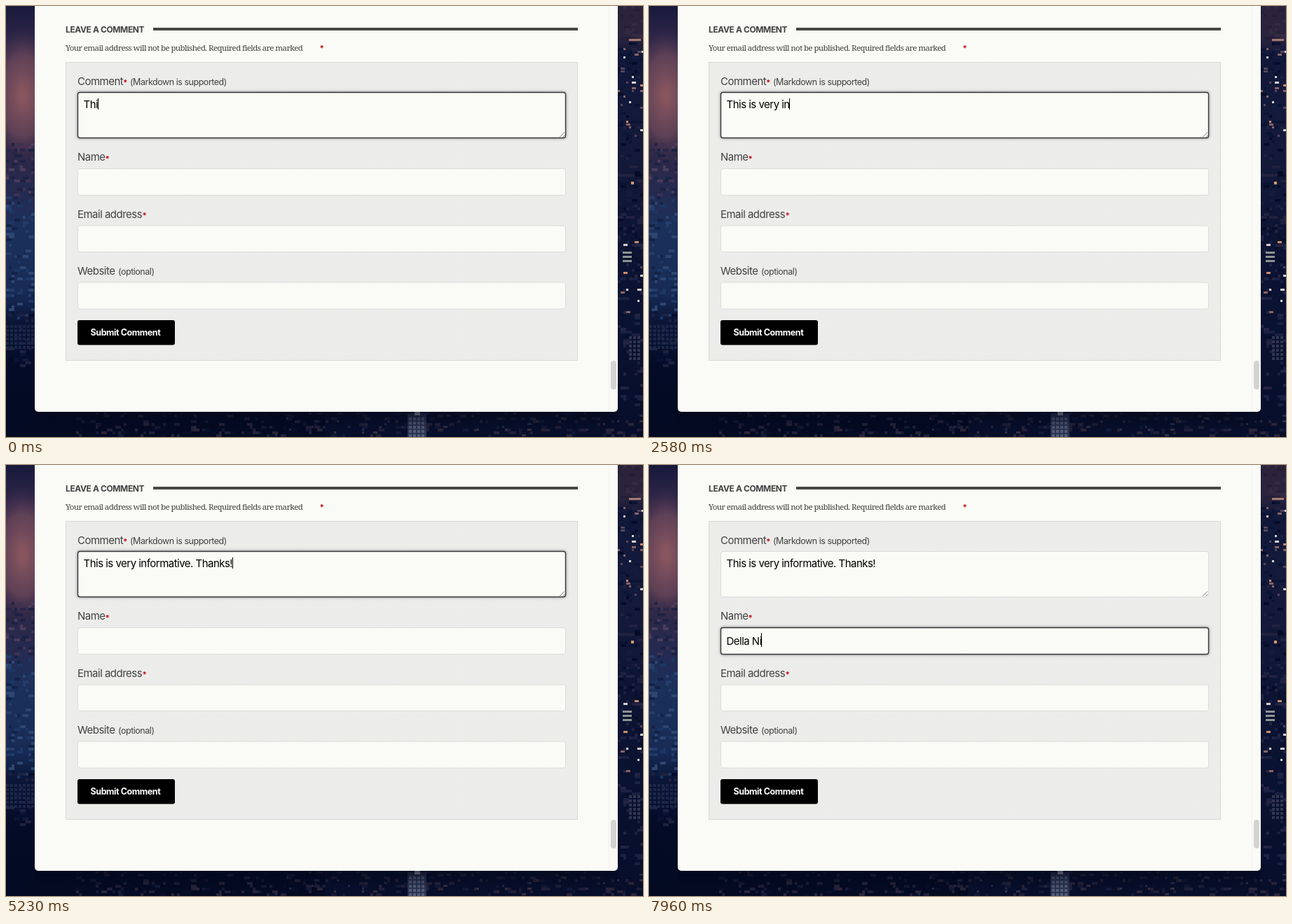
An HTML page with a canvas that plays this animation: 909 px wide and 616 px high, repeating every 8 s.

```html
<!DOCTYPE html>
<html lang="en">
<head>
<meta charset="utf-8">
<title>Comment form</title>
<style>
  html, body { margin: 0; width: 100%; height: 100%; overflow: hidden; background: #050c26; }
  canvas, svg { position: absolute; left: 0; top: 0; }
  text { font: 15px Inter, sans-serif; letter-spacing: -.52px; fill: #414141; white-space: pre; }
  .small { font-size: 12.5px; letter-spacing: -.47px; }
  .title { font-size: 12px; font-weight: 700; letter-spacing: -.38px; }
  .note { font: 11.5px "Noto Serif", serif; letter-spacing: -.6px; }
  .send { font-size: 12.5px; font-weight: 700; letter-spacing: -.42px; fill: #fff; }
  .star { font-size: 11px; font-weight: 800; fill: #c4161c; }
  .typed { fill: #000; }
  .field { fill: #fafbf6; stroke: #dbdbd9; }
  .focus { stroke: #37383b; stroke-width: 1.4; filter: drop-shadow(0 0 2px #8b8b8b); }
</style>
</head>
<body>
<canvas id="city" width="909" height="616"></canvas>
<svg width="909" height="616">
  <defs>
    <pattern id="hatch" width="4" height="4" patternUnits="userSpaceOnUse">
      <path d="M-1 1 1 -1M0 4 4 0M3 5 5 3" stroke="#e7e7e6"/>
    </pattern>
  </defs>
  <rect x="41" y="-10" width="832" height="590" rx="5" fill="#fafbf6"/>
  <path d="M860.5 0V580" stroke="#f0f1ed"/>
  <rect x="863" y="507" width="8" height="41" rx="4" fill="#d3d3d1"/>

  <text class="title" x="85" y="38">LEAVE A COMMENT</text>
  <rect x="210" y="31" width="606" height="4" fill="#474743"/>
  <text class="note" x="85" y="64">Your email address will not be published. Required fields are marked</text>
  <text class="star" x="447.500" y="64">*</text>

  <rect x="85.500" y="80.500" width="730" height="426" fill="#eeeeed"/>
  <rect x="85.500" y="80.500" width="730" height="426" fill="url(#hatch)" stroke="#d8d8d6"/>

  <text x="102" y="112.500">Comment</text>
  <text class="star" x="167" y="112.500">*</text>
  <text class="small" x="177" y="112.500">(Markdown is supported)</text>
  <text x="102" y="221">Name</text>
  <text class="star" x="141.500" y="221.500">*</text>
  <text x="102" y="302.500">Email address</text>
  <text class="star" x="194.500" y="302.500">*</text>
  <text x="102" y="384">Website</text>
  <text class="small" x="160" y="384">(optional)</text>

  <rect class="field" id="commentBox" x="102.500" y="123.500" width="696" height="65" rx="3"/>
  <path d="M790 187.500 797 180.500M794.500 187.500 797.500 184.500" stroke="#777"/>
  <rect class="field" id="nameBox" x="102.500" y="232.500" width="696" height="38" rx="3"/>
  <rect class="field" x="102.500" y="314" width="696" height="37.500" rx="3"/>
  <rect class="field" x="102.500" y="395" width="696" height="38" rx="3"/>
  <text class="typed" id="comment" x="110.500" y="145.500"></text>
  <text class="typed" id="name" x="110.500" y="257"></text>
  <rect id="caret" width="1"/>

  <rect x="102" y="449" width="139" height="35.500" rx="3"/>
  <text class="send" x="120.500" y="471">Submit Comment</text>
</svg>
<script>
const $ = id => document.getElementById(id);
const LOOP = 8000, SWITCH = 5760;
const COMMENT = "This is very informative. Thanks!", NAME = "Della Ni";

// Times at which successive characters appear; "from, count, last" spreads keys evenly.
const run = (from, count, last) =>
  Array.from({ length: count }, (_, i) => Math.round(from + (last - from) * i / (count - 1)));
const commentKeys = [0, 0, 0, 60, 210, 390, 1100, 1640, 1820, 2000, 2085, 2085, 2170,
  ...run(2350, 7, 3050), 3170, 3400, 3580, 3690, 4230, 4410, ...run(4580, 6, 4930), 5230];
const nameKeys = [6780, ...run(7080, 4, 7420), 7600, 7780, 7960];
const typed = (text, keys, t) => text.slice(0, keys.filter(k => k <= t).length);

function drawCity() {
  const c = $("city").getContext("2d");
  let seed = 7;
  const rnd = () => (seed = seed * 16807 % 2147483647) / 2147483647;
  const fill = (color, x, y, w, h) => { c.fillStyle = color; c.fillRect(x, y, w, h); };
  const sky = (x, w, stops) => {
    const g = c.createLinearGradient(0, 0, 0, 616);
    stops.forEach(([y, color]) => g.addColorStop(y / 616, color));
    fill(g, x, 0, w, 616);
  };
  const specks = (n, x, y, w, h, colors, size = 4) => {
    for (let i = 0; i < n; i++)
      fill(colors[rnd() * colors.length | 0], x + (rnd() * w / 4 | 0) * 4,
        y + (rnd() * h / 4 | 0) * 4, size * (1 + (rnd() * 2 | 0)), size);
  };
  const windows = (x, y, cols, rows, color) => {
    for (let i = 0; i < cols * rows; i++)
      fill(color, x + i % cols * 6, y + (i / cols | 0) * 6, 4, 4);
  };

  sky(0, 455, [[0, "#171a3b"], [60, "#33284a"], [200, "#302744"], [260, "#252a50"],
    [320, "#1b305b"], [410, "#172b55"], [450, "#0b1638"], [520, "#030b26"], [616, "#030a22"]]);
  sky(455, 454, [[0, "#2b2339"], [45, "#2b243d"], [70, "#10183a"], [200, "#151a3a"],
    [330, "#0d1433"], [460, "#0a1231"], [616, "#070e2a"]]);

  c.save();
  c.translate(24, 128);
  c.scale(.55, 1);
  const glow = c.createRadialGradient(0, 0, 8, 0, 0, 100);
  glow.addColorStop(0, "#87555f");
  glow.addColorStop(.55, "#694659cc");
  glow.addColorStop(1, "#33284a00");
  fill(glow, -60, -100, 160, 200);
  c.restore();

  const dusk = ["#3d3354", "#272747", "#4b3d5c", "#1c2244"];
  const blue = ["#243d6b", "#122246", "#1c3766", "#2d4673"];
  const night = ["#0a1434", "#141b3d", "#20223f", "#050c28"];
  const lamps = ["#c98b6b", "#8a6264", "#d5d2cf", "#56475b"];
  specks(45, 0, 196, 40, 76, dusk);
  specks(70, 0, 272, 40, 176, blue);
  specks(35, 0, 420, 40, 100, night);
  windows(0, 456, 7, 6, "#1c2747");

  specks(20, 873, 0, 36, 48, ["#342a43", "#241f38"]);
  fill("#a77b70", 889, 47, 17, 3);
  specks(110, 873, 52, 36, 280, night);
  specks(24, 873, 56, 36, 145, lamps, 3);
  specks(95, 873, 320, 36, 250, ["#1a2142", "#252442", "#080f2b"]);
  specks(10, 873, 320, 36, 130, lamps, 3);
  for (let y = 351; y < 369; y += 6) fill("#8d9390", 880, y, 13, 3);
  fill("#d49a72", 892, 251, 4, 4);
  windows(889, 472, 3, 6, "#313550");

  specks(270, 100, 580, 809, 36, ["#131936", "#211f38", "#292438", "#080e29"]);
  specks(30, 380, 584, 529, 32, ["#35303f", "#222b4c"], 3);
  fill("#293453", 573, 582, 27, 34);
  fill("#a7a9ac", 583, 580, 8, 5);
  windows(575, 588, 4, 5, "#535b73");

  const shade = c.createLinearGradient(0, 580, 0, 606);
  shade.addColorStop(0, "#02071aa0");
  shade.addColorStop(1, "#02071a00");
  fill(shade, 41, 580, 832, 26);
}

const start = performance.now();
function frame(now) {
  const t = Math.max(0, now - start) % LOOP;
  const inName = t >= SWITCH;
  $("comment").textContent = typed(COMMENT, commentKeys, t);
  $("name").textContent = typed(NAME, nameKeys, t);
  $("commentBox").classList.toggle("focus", !inName);
  $("nameBox").classList.toggle("focus", inName);

  const line = $(inName ? "name" : "comment");
  const empty = !line.textContent;
  const hidden = t >= 860 && t < 1100 || t >= 6300 && t < 6780;
  const caret = $("caret");
  caret.setAttribute("x", Math.round(110 + (empty ? 0 : line.getComputedTextLength())));
  caret.setAttribute("y", inName ? 240 : 132);
  caret.setAttribute("height", empty ? 22 : inName ? 20 : 16);
  caret.setAttribute("visibility", hidden ? "hidden" : "visible");
  requestAnimationFrame(frame);
}
drawCity();
requestAnimationFrame(frame);
</script>
</body>
</html>
```
